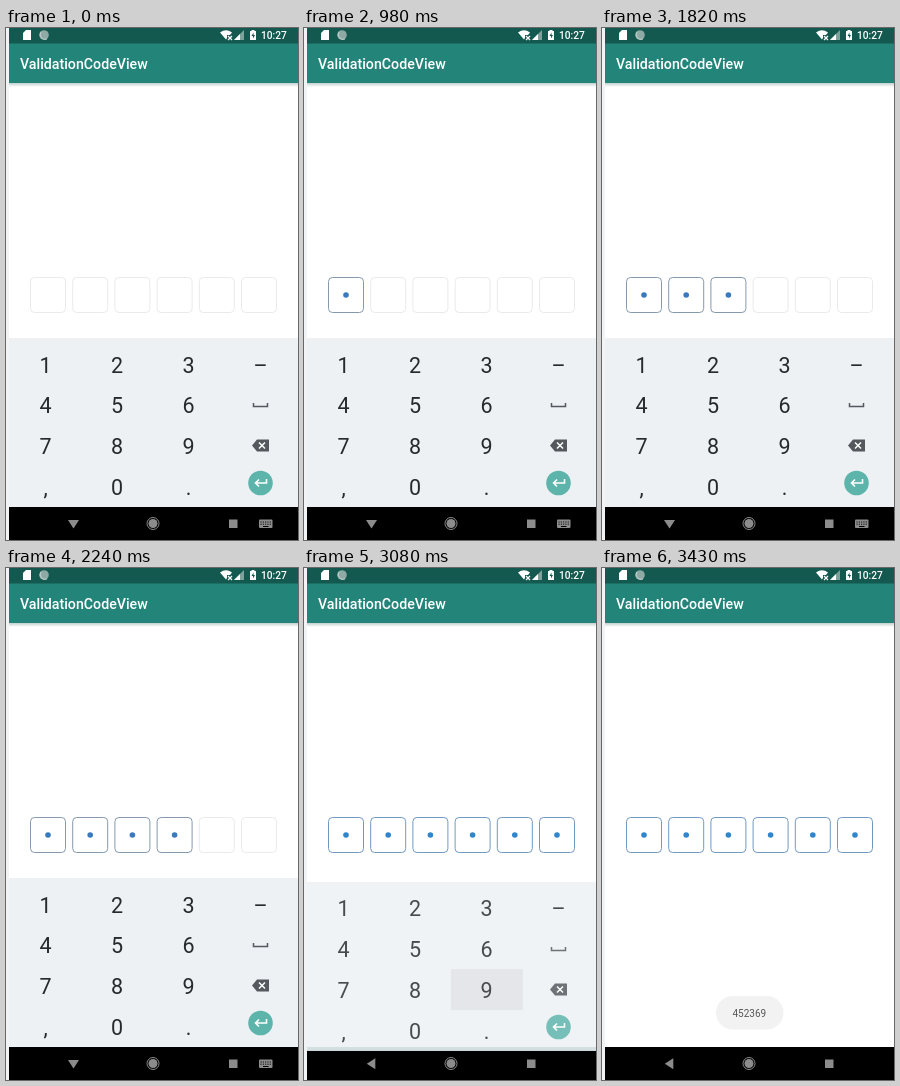
An HTML page that plays this animation: 292 by 512 pixels, repeating every 3.5 s.

```html
<!DOCTYPE html>
<html lang="en">
<head>
<meta charset="utf-8">
<title>ValidationCodeView</title>
<style>
  html, body { margin: 0; width: 100%; height: 100%; overflow: hidden; background: #fff; }
  svg { display: block; width: 292px; height: 512px; font-family: Roboto, sans-serif; }
  .box { fill: #fff; stroke: #e9eaec; }
  .box.on { stroke: var(--line); }
  .dot { fill: var(--dot); visibility: hidden; }
  .on + .dot { visibility: visible; }
  .key { font-size: 21.5px; text-anchor: middle; fill: #272a2d; }
</style>
</head>
<body>
<svg id="stage" viewBox="0 0 292 512">
  <defs>
    <linearGradient id="shade" x2="0" y2="1">
      <stop stop-color="#c3cfce"/><stop offset="1" stop-color="#fff"/>
    </linearGradient>
  </defs>
  <rect width="292" height="512" fill="#fff"/>
  <rect width="3" height="512" fill="#f1f3f5"/>
  <rect x="3" y="55" width="289" height="4" fill="url(#shade)"/>
  <rect x="3" y="15" width="289" height="40" fill="#23857a"/>
  <rect x="3" width="289" height="15.5" fill="#13594f"/>
  <text x="14" y="41" font-size="14.2" font-weight="500" fill="#fff">ValidationCodeView</text>

  <g id="status" fill="#fff">
    <path d="M20 2h5v10h-8V5z"/>
    <circle cx="38" cy="7" r="4.8" fill="#8fa9a5"/>
    <path d="M35 4a4.8 4.8 0 0 0 6 7" fill="none" stroke="#c4d2d0"/>
    <path d="M214 4.5q6-4.500 12 0l-2 2.500h-3v3l-1 1.500z"/>
    <path d="M222 8l4 4m0-4l-4 4" stroke="#fff" stroke-width="1.200"/>
    <path d="M228 12l10-10v10z" fill="#7fa19c"/>
    <path d="M228 12l6-6v6z"/>
    <path d="M244 3h1.500v-1h3v1h1.500v9h-6z"/>
    <path d="M247.500 4.500l-2 3.500h1.500v2.500l2-3.500h-1.500z" fill="#13594f"/>
    <text x="255" y="11" font-size="10.2" font-weight="500">10:27</text>
  </g>

  <g id="boxes"></g>

  <g id="keyboard">
    <rect x="3" y="310" width="289" height="169" fill="#edf1f4"/>
    <rect id="press" width="72" height="41" fill="#dfe2e6"/>
    <g id="keys"></g>
    <path d="M247.500 375v3.500h14V375" fill="none" stroke="#55595d" stroke-width="1.500"/>
    <path d="M246 417.500l5-6h12v12h-12z" fill="#55595d"/>
    <path d="M253 414.500l6 6m0-6l-6 6" stroke="#fff" stroke-width="1.500"/>
    <circle cx="254.500" cy="455" r="12.300" fill="#5db4ab"/>
    <path d="M260.500 451v4h-11m3.500-3.500l-3.500 3.500l3.500 3.500" fill="none" stroke="#fff" stroke-width="1.600"/>
  </g>

  <rect id="toast" x="114" y="428" width="67.500" height="33.500" rx="16.700" fill="#f2f2f2"/>
  <text id="message" x="147.300" y="448.500" font-size="10" text-anchor="middle" fill="#555">452369</text>

  <rect x="3" y="479" width="289" height="33" fill="#000"/>
  <rect id="gap" x="3" y="479" width="289" fill="#d3dfe1"/>
  <g fill="#8c8c8c">
    <path id="back" d="M62 492h11l-5.500 8.500z"/>
    <circle cx="147" cy="495.500" r="4.500"/>
    <circle cx="147" cy="495.500" r="6" fill="none" stroke="#8c8c8c"/>
    <rect x="223" y="491.500" width="8.500" height="8.500"/>
    <g id="imeIcon">
      <rect x="253" y="491.500" width="13.500" height="8.500" rx="1"/>
      <path d="M254.500 494h10.500m-10.500 2.200h10.500" stroke="#000" stroke-dasharray="1.100 1.200"/>
      <path d="M257 498.500h5.500" stroke="#000"/>
    </g>
  </g>
</svg>
<script>
const LOOP = 3500, STEP = 70, HIDE = 3010, HIDE_TIME = 210;
const code = '452369';
const downTimes = [910, 1260, 1680, 2100, 2450, 2940];
const columns = [39.5, 111, 182.5, 254.5];
const el = id => document.getElementById(id);
const clamp = v => Math.max(0, Math.min(1, v));

el('boxes').innerHTML = downTimes.map((_, i) => {
  const x = 24.5 + 42.2 * i;
  return `<rect class="box" x="${x}" y="249.500" width="35" height="35" rx="4"/>
    <circle class="dot" cx="${x + 17.5}" cy="267" r="2.800"/>`;
}).join('');

el('keys').innerHTML = ['123–', '456', '789', ',0.'].map((row, r) =>
  [...row].map((char, c) =>
    `<text class="key" x="${columns[c]}" y="${344.5 + 40.7 * r}">${char}</text>`).join('')
).join('');

const boxes = document.querySelectorAll('.box');

function render(t) {
  const hide = clamp((t - HIDE) / HIDE_TIME) ** 1.3;
  const shift = 16.5 * hide;
  const hiding = hide > 0;

  boxes.forEach((box, i) => box.classList.toggle('on', t >= downTimes[i] + STEP));
  el('stage').style.setProperty('--line', t < HIDE ? '#8599ac' : '#7199c2');
  el('stage').style.setProperty('--dot', t < HIDE ? '#3979bd' : '#2f86cc');

  const pressed = downTimes.findIndex((down, i) => t >= down && (i === 5 || t < down + STEP));
  el('press').style.display = pressed < 0 ? 'none' : '';
  if (pressed >= 0) {
    const n = code[pressed] - 1;
    el('press').setAttribute('x', 3.5 + 71.7 * (n % 3));
    el('press').setAttribute('y', 316 + 40.6 * Math.floor(n / 3));
  }

  el('keyboard').setAttribute('transform', `translate(0 ${shift})`);
  el('keyboard').style.opacity = 1 - hide ** 1.3;
  el('gap').setAttribute('height', hide < 1 ? Math.min(shift, 4) : 0);
  el('back').setAttribute('transform', hiding ? 'rotate(90 67.500 495.800)' : '');
  el('imeIcon').style.display = hiding ? 'none' : '';

  const toast = clamp((t - 3220) / 210);
  el('toast').style.opacity = el('message').style.opacity = toast;
}

function frame() {
  const t = performance.now() % LOOP;
  render(Math.floor(t / STEP) * STEP);
  requestAnimationFrame(frame);
}
frame();
</script>
</body>
</html>
```
